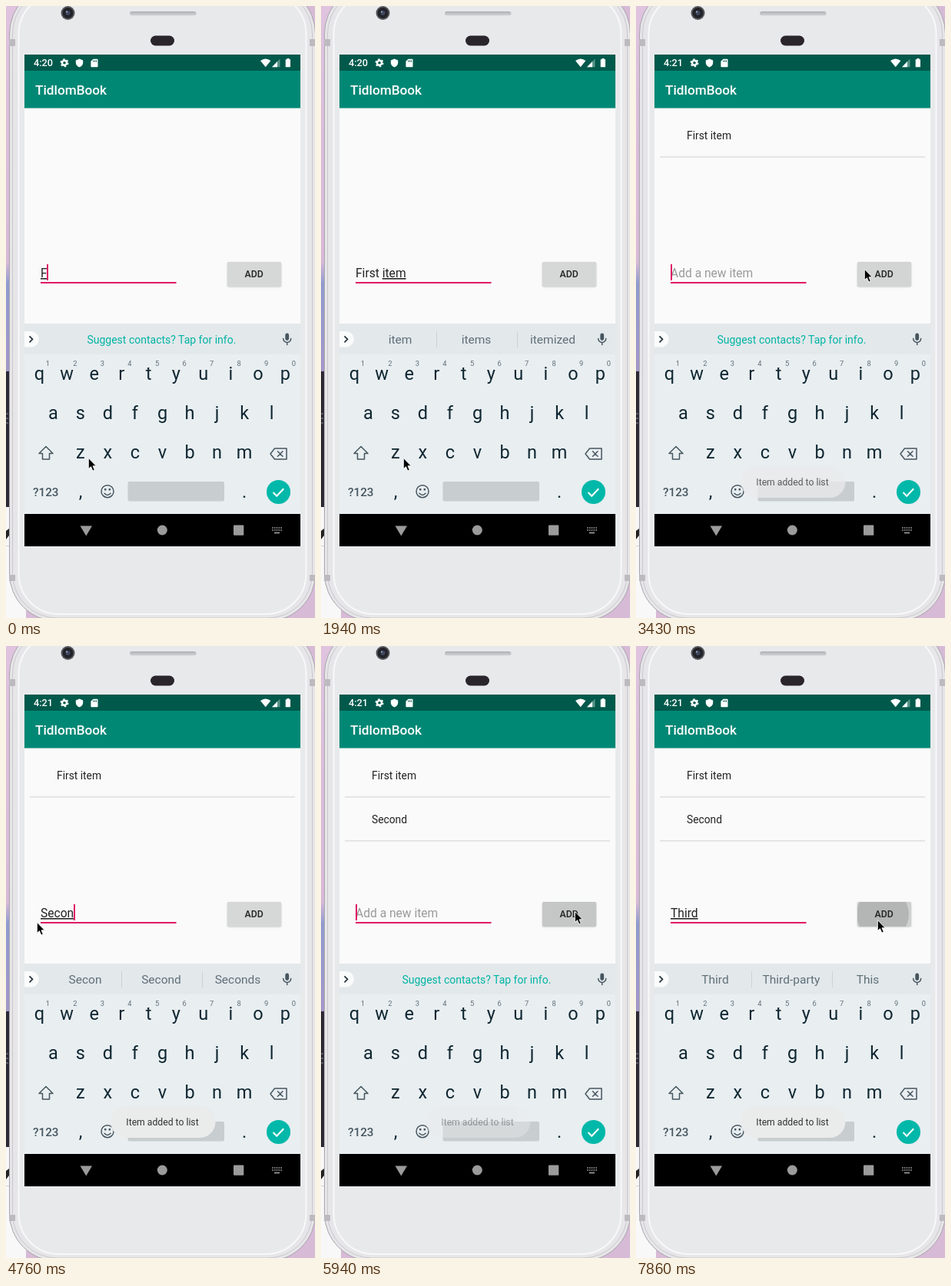
Recreate the animation shown at these times as an HTML page. Size 402 px wide and 794 px high, loop 8000 ms.

```html
<!DOCTYPE html>
<html lang="en">
<head>
<meta charset="utf-8">
<title>To-do list demo</title>
<style>
html, body { margin: 0; width: 100%; height: 100%; overflow: hidden; background: #dbc0db; }
svg { display: block; width: 402px; height: 794px; font-family: Roboto, "Noto Sans", sans-serif; }
text { white-space: pre; }
.mid { text-anchor: middle; }
.bold { font-weight: 500; }
.u { text-decoration: underline; text-decoration-thickness: 1px; }
.line { fill: none; stroke: #46565f; stroke-width: 1.5; stroke-linejoin: round; stroke-linecap: round; }
</style>
</head>
<body>
<svg viewBox="0 0 402 794">
  <defs>
    <linearGradient id="wall" x1="0" y1="0" x2="0" y2="1">
      <stop offset="0" stop-color="#dfc3df"/>
      <stop offset=".7" stop-color="#d9b9d8"/>
      <stop offset=".76" stop-color="#8f9bd0"/>
      <stop offset="1" stop-color="#a497c9"/>
    </linearGradient>
    <linearGradient id="slot" x1="0" y1="0" x2="0" y2="1">
      <stop offset="0" stop-color="#aeb0b3"/>
      <stop offset="1" stop-color="#d3d4d6"/>
    </linearGradient>
    <clipPath id="btnClip"><rect x="288" y="332" width="70" height="32" rx="1.5"/></clipPath>
    <filter id="soft" x="-10%" y="-20%" width="120%" height="150%"><feGaussianBlur stdDeviation="1"/></filter>
  </defs>

  <!-- desktop behind the phone -->
  <rect width="402" height="794" fill="#d6bad6"/>
  <rect width="26" height="474" fill="url(#wall)"/>
  <rect y="474" width="12" height="176" fill="#2b2a35"/>
  <path d="M0 529h3M0 535h3M0 541h3" stroke="#8b8a96"/>
  <rect y="650" width="26" height="144" fill="#f8f8f9"/>
  <path d="M0 681l4-3v9l-4 5z" fill="#222"/>
  <path d="M0 700.5h6" stroke="#d0d0d2"/>

  <!-- phone body -->
  <rect x="4.5" y="-26" width="398" height="824" rx="62" fill="#e6e5e8" stroke="#a9a5ab"/>
  <rect x="8.5" y="-22" width="390" height="816" rx="58" fill="none" stroke="#cbc8cd"/>
  <path d="M4 43h8v9H4zM395 43h8v9h-8zM4 738h8v8H4zM395 738h8v8h-8z" fill="#bdbabf"/>
  <rect x="16.5" y="-16" width="374" height="805" rx="52" fill="#e8e9eb" stroke="#f8f8f9" stroke-width="2"/>
  <circle cx="80.500" cy="9" r="9" fill="#55565a"/>
  <circle cx="80.500" cy="9" r="7" fill="#222328"/>
  <circle cx="80.500" cy="9" r="3" fill="#3f4862"/>
  <circle cx="79" cy="7.500" r="1" fill="#a9b2c8"/>
  <rect x="161" y="7" width="86.500" height="5.500" rx="2.700" fill="url(#slot)"/>
  <rect x="188" y="38.500" width="31" height="13" rx="6.500" fill="#29252b"/>

  <!-- app content, then the bars over it -->
  <rect x="24" y="132" width="359" height="280" fill="#fafafa"/>
  <rect x="24" y="63" width="359" height="21" fill="#00594b"/>
  <rect x="24" y="84" width="359" height="48.500" fill="#008875"/>
  <g fill="#fff">
    <text id="clock" class="bold" x="36" y="78.300" font-size="12.700"></text>
    <circle cx="76" cy="73.800" r="3" fill="none" stroke="#fff" stroke-width="2.400"/>
    <circle cx="76" cy="73.800" r="4.700" fill="none" stroke="#fff" stroke-width="1.600" stroke-dasharray="2.460"/>
    <path d="M95.500 68.500l4.700 2v3.300c0 2.600-2 4.700-4.700 5.700-2.700-1-4.700-3.100-4.700-5.700v-3.300z"/>
    <path fill-rule="evenodd" d="M113.500 68.700h5.200q.8 0 .8.800v9q0 .8-.8.800h-7.500q-.8 0-.8-.8v-6.700zM113.200 70.500v2h1.100v-2zM115.100 70.500v2h1.100v-2zM117 70.500v2h1.100v-2z"/>
    <path d="M331 71q6.700-5 13.400 0l-6.700 8.300z"/>
    <path d="M356.500 68.500v10.800h-10.500z" opacity=".35"/>
    <path d="M353 72.100v7.200h-7z"/>
    <path d="M365.500 68h3v1.200h1.500v10.100h-6.300V69.200h1.800z"/>
    <text class="bold" x="38" y="115" font-size="17.200">TidlomBook</text>
  </g>
  <g id="list" font-size="13.800" fill="#212121"></g>
  <rect x="45" y="358" width="176.500" height="2" fill="#e01a66"/>
  <text id="hint" x="45" y="352" font-size="15.600" fill="#9a9a9a">Add a new item</text>
  <text id="field" x="45" y="352" font-size="15.600" fill="#222"><tspan id="done"></tspan><tspan id="typing" class="u"></tspan></text>
  <rect id="caret" y="335" width="2" height="21" fill="#e01a66"/>
  <rect x="288" y="333" width="70" height="31.500" rx="2" fill="#000" opacity=".22" filter="url(#soft)"/>
  <rect x="288" y="332" width="70" height="32" rx="1.500" fill="#d6d7d7"/>
  <g clip-path="url(#btnClip)">
    <rect id="press" x="288" y="332" width="70" height="32"/>
    <circle id="ripple" opacity=".13"/>
  </g>
  <text class="mid bold" x="322.700" y="352.300" font-size="12.300" fill="#222">ADD</text>

  <!-- suggestion strip -->
  <rect x="24" y="412" width="359" height="40" fill="#e3e8eb"/>
  <path d="M24 422h8.500a10.300 10.300 0 0 1 0 20.600H24z" fill="#fafbfb"/>
  <path d="M30.500 428.300l4 4-4 4" fill="none" stroke="#26343c" stroke-width="1.700"/>
  <text id="info" class="mid" x="202.400" y="437.500" font-size="14" fill="#00b5a4">Suggest contacts? Tap for info.</text>
  <g id="words" class="mid" font-size="15.500" fill="#5f6f78">
    <path d="M150.500 422v21M255.500 422v21" stroke="#cbd1d4"/>
    <text x="103" y="438"></text><text x="202" y="438"></text><text x="301.500" y="438"></text>
  </g>
  <rect x="363.300" y="424.500" width="4.800" height="9.500" rx="2.400" fill="#46565f"/>
  <path class="line" d="M360.700 431.500a5 5 0 0 0 10 0M365.700 436.800v2.700"/>

  <!-- keyboard -->
  <rect x="24" y="451.500" width="359" height="208" fill="#e9eef1"/>
  <g id="keys" class="mid" font-size="23.500" fill="#0f2731"></g>
  <path class="line" d="M52 571.500l9 9h-4.500v7.500h-9v-7.500H43z"/>
  <path class="line" d="M349.500 574H365v14h-15.500l-5.500-7zM353.500 577.800l6.500 6.500M360 577.800l-6.500 6.500"/>
  <text class="bold" x="35" y="635.500" font-size="15.300" fill="#46565f">?123</text>
  <circle class="line" cx="132" cy="629.700" r="8"/>
  <path class="line" d="M128 632.300q4 4.400 8 0"/>
  <path d="M128 626h2.400v2.400H128zM133.600 626h2.400v2.400h-2.400z" fill="#46565f"/>
  <rect x="158.500" y="617" width="125.500" height="25.500" rx="2" fill="#c8cdd0"/>
  <circle cx="354.500" cy="630.500" r="15.500" fill="#00b8a9"/>
  <path d="M347.500 631l4.700 4.700 9-9.500" fill="none" stroke="#fff" stroke-width="2"/>
  <g id="toast">
    <rect x="136" y="597" width="136.500" height="41" rx="20.500" fill="#eaebeb"/>
    <text class="mid" x="203.500" y="622" font-size="12.200" fill="#333">Item added to list</text>
  </g>

  <!-- navigation bar -->
  <rect x="24" y="659" width="359" height="42"/>
  <g fill="#9b9b9b">
    <path d="M96.500 674.500h15.500l-7.750 13z"/>
    <circle cx="203.300" cy="680" r="6.500"/>
    <rect x="296" y="673.500" width="13.300" height="13.300" rx="1"/>
    <path d="M346 677h13M346 680h13" stroke="#9b9b9b" stroke-width="1.700" stroke-dasharray="1.700 1.120"/>
    <path d="M349 683.500h7" stroke="#9b9b9b" stroke-width="1.700"/>
  </g>

  <path id="mouse" d="M-.7 .5v14l3.200-2.800 2.300 5.400 2.500-1.100-2.300-5.200h4.300z" fill="#000" stroke="#fff" stroke-width=".9"/>
</svg>

<script>
const LOOP = 8000;
const $ = id => document.getElementById(id);
const NS = "http://www.w3.org/2000/svg";

function add(parent, tag, attrs, text = "") {
  const el = document.createElementNS(NS, tag);
  for (const k in attrs) el.setAttribute(k, attrs[k]);
  el.textContent = text;
  parent.append(el);
  return el;
}

// A row of keys centred on the screen
function keyRow(letters, y, attrs = {}, shift = 0) {
  const left = 203.5 + shift - (letters.length - 1) / 2 * 35.55;
  [...letters].forEach((c, i) => add($("keys"), "text", { x: left + i * 35.55, y, ...attrs }, c));
}
keyRow("qwertyuiop", 485);
keyRow("asdfghjkl", 536);
keyRow("zxcvbnm", 587);
keyRow(",", 638, {}, -106.5);
keyRow(".", 638, {}, 106.5);
keyRow("1234567890", 467, { "font-size": 9.3, fill: "#5f6f78" }, 10.8);

const rows = ["First item", "Second"].map((name, i) => {
  const row = add($("list"), "g", {});
  add(row, "text", { x: 66, y: 173 + i * 57 }, name);
  add(row, "rect", { x: 31, y: 195 + i * 57, width: 345, height: 1.5, fill: "#dfdfdf" });
  return row;
});

// Each step changes some of the state and holds until the next one.
// done: committed text, typing: underlined text, rip: [x, y, radius]
const steps = [
  [0, { clock: "4:20", done: "", typing: "F", words: "", caret: 1, items: 0, toast: 0, press: 0, rip: [0, 0, 0], mouse: [108, 586] }],
  [300, { typing: "Fir", words: "Fir First Fire" }],
  [450, { typing: "First", words: "First Firsts First’s" }],
  [750, { done: "First ", typing: "", words: "thing time one" }],
  [1040, { typing: "i" }],
  [1190, { typing: "it", words: "it item items" }],
  [1340, { typing: "ite", words: "item items itemized" }],
  [1490, { typing: "item" }],
  [1940, { caret: 0 }],
  [2240, { mouse: [148, 545] }],
  [2390, { mouse: [232, 458] }],
  [2540, { mouse: [301, 376], caret: 1 }],
  [2690, { mouse: [332, 316] }],
  [2830, { mouse: [314, 328] }],
  [2980, { mouse: [298, 341], caret: 0, clock: "4:21" }],
  [3130, { press: .04, rip: [306, 345, 20] }],
  [3280, { done: "", typing: "", words: "", caret: 1, items: 1, toast: .35, press: .08, rip: [0, 0, 0] }],
  [3430, { toast: .75, press: .01 }],
  [3580, { toast: 1, press: 0, mouse: [142, 354] }],
  [3720, { mouse: [41, 358], caret: 0 }],
  [4010, { typing: "S", caret: 1 }],
  [4310, { typing: "Se", words: "Se See Send" }],
  [4610, { typing: "Seco", words: "Seco Second Seconds" }],
  [4760, { typing: "Secon", words: "Secon Second Seconds" }],
  [5060, { typing: "Second", words: "Second Seconds Secondary" }],
  [5210, { mouse: [118, 357] }],
  [5360, { mouse: [262, 352], toast: .6 }],
  [5500, { mouse: [352, 346], toast: 0 }],
  [5650, { mouse: [333, 344], caret: 0 }],
  [5800, { mouse: [331, 344], press: .04, rip: [327, 346, 22] }],
  [5940, { done: "", typing: "", words: "", caret: 1, items: 2, toast: .4, press: .08, rip: [0, 0, 0] }],
  [6090, { toast: .85, press: 0, mouse: [315, 352] }],
  [6230, { toast: 1 }],
  [6380, { caret: 0 }],
  [6680, { typing: "T", caret: 1 }],
  [6830, { typing: "Th", words: "The This Thanks" }],
  [6980, { typing: "Thi", words: "Thi This Think" }],
  [7120, { typing: "Third", words: "Third Third-party This" }],
  [7270, { mouse: [315, 353] }],
  [7420, { mouse: [315, 354] }],
  [7560, { mouse: [315, 355] }],
  [7710, { caret: 0, rip: [311, 354, 15] }],
  [7860, { press: .03, rip: [321, 348, 34] }],
];

const stateAt = t => Object.assign({}, ...steps.filter(s => s[0] <= t).map(s => s[1]));
const show = (el, on) => el.setAttribute("visibility", on ? "visible" : "hidden");

function draw(s) {
  $("clock").textContent = s.clock;
  $("done").textContent = s.done;
  $("typing").textContent = s.typing;
  const empty = !(s.done + s.typing);
  show($("hint"), empty);
  const width = empty ? 0 : $("field").getComputedTextLength();
  $("caret").setAttribute("x", Math.floor(45 + width));
  show($("caret"), s.caret);
  rows.forEach((row, i) => show(row, i < s.items));
  show($("info"), !s.words);
  show($("words"), s.words);
  const words = s.words.split(" ");
  $("words").querySelectorAll("text").forEach((el, i) => el.textContent = words[i] || "");
  $("toast").setAttribute("opacity", s.toast);
  $("press").setAttribute("opacity", s.press);
  ["cx", "cy", "r"].forEach((k, i) => $("ripple").setAttribute(k, s.rip[i]));
  $("mouse").setAttribute("transform", `translate(${s.mouse})`);
}

const start = performance.now();
function tick() {
  draw(stateAt((performance.now() - start) % LOOP));
  requestAnimationFrame(tick);
}
tick();
</script>
</body>
</html>
```
